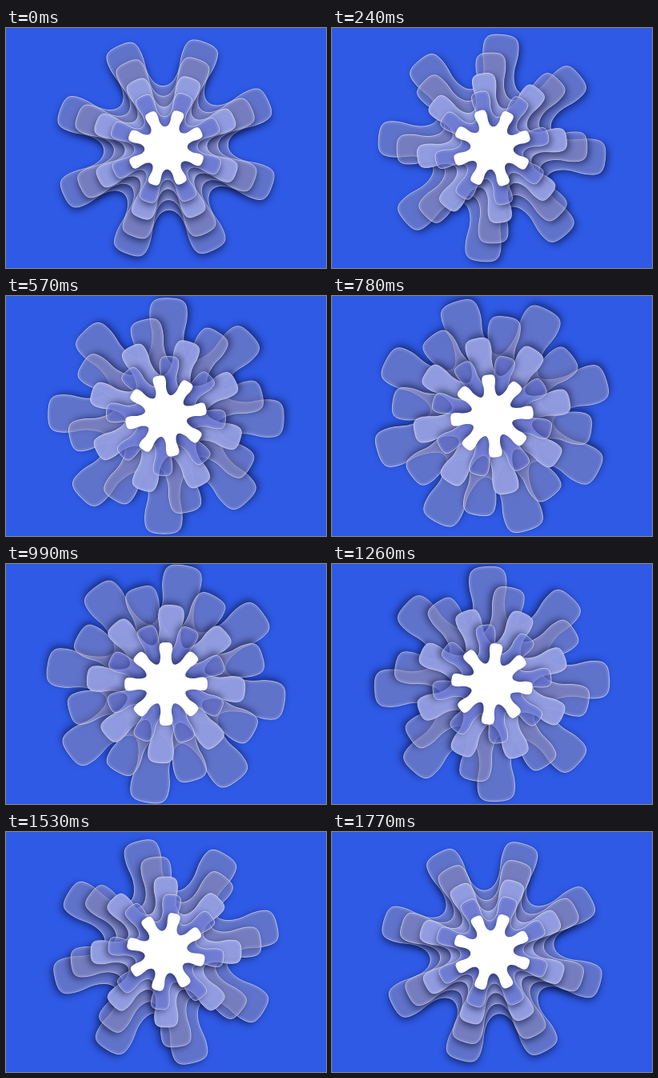
An HTML page with a canvas that plays this animation: 400x300 px, repeating every 1.8 s.

```html
<!DOCTYPE html>
<html lang="en">
<head>
<meta charset="utf-8">
<title>Layered flower</title>
<style>
  html, body { margin: 0; width: 100%; height: 100%; overflow: hidden; background: #2f5ae5; }
  canvas { display: block; width: 400px; height: 300px; }
</style>
</head>
<body>
<canvas id="stage"></canvas>
<script>
const W = 400, H = 300, LOOP = 1800, ARMS = 8;
const STEP = Math.PI * 2 / ARMS;
const REST = 20 * Math.PI / 180;

// From back to front; turns = arm steps travelled per loop
const layers = [
  { radius: 150, turns: 5, fill: 'rgba(134,135,183,.57)' },
  { radius: 125.5, turns: 4, fill: 'rgba(134,135,183,.57)' },
  { radius: 99, turns: 3, fill: 'rgba(147,157,225,.95)' },
  { radius: 76, turns: 2, fill: 'rgba(86,100,200,.57)' },
  { radius: 52, turns: 1, fill: '#fff', solid: true }
];

const canvas = document.getElementById('stage');
const ctx = canvas.getContext('2d');
const dpr = window.devicePixelRatio || 1;
canvas.width = W * dpr;
canvas.height = H * dpr;

// Star outline of unit radius; open runs 0..1 over the swell
function starPath(open) {
  const tip = .154 + .006 * open;
  const neck = .132;
  const valley = .55 - .04 * open;
  const half = STEP / 2;
  const vx = valley * Math.sin(half), vy = valley * Math.cos(half);
  const tx = .055 * Math.cos(half), ty = .055 * Math.sin(half);
  const side = [
    [vx - tx, vy + ty, neck, .59, neck, .67],
    [neck, .74, tip, .78, tip, .86],
    [tip, .97, tip * .83, 1, 0, 1],
    [-tip * .83, 1, -tip, .97, -tip, .86],
    [-tip, .78, -neck, .74, -neck, .67],
    [-neck, .59, tx - vx, vy + ty, -vx, vy]
  ];
  const path = new Path2D();
  for (let i = 0; i < ARMS; i++) {
    const c = Math.cos(i * STEP), s = Math.sin(i * STEP);
    const turn = (x, y) => [x * c - y * s, x * s + y * c];
    if (i === 0) path.moveTo(vx, vy);
    for (const b of side) {
      path.bezierCurveTo(...turn(b[0], b[1]), ...turn(b[2], b[3]), ...turn(b[4], b[5]));
    }
  }
  path.closePath();
  return path;
}

function place(unit, radius, angle) {
  const path = new Path2D();
  path.addPath(unit, new DOMMatrix()
    .translate(W / 2, H / 2)
    .rotate(angle * 180 / Math.PI)
    .scale(radius));
  return path;
}

// Casts a shadow; glass layers keep it outside their own outline
function drawShadow(layer, path, light) {
  ctx.save();
  if (!layer.solid) {
    const outside = new Path2D();
    outside.rect(-W, -H, 3 * W, 3 * H);
    outside.addPath(path);
    ctx.clip(outside, 'evenodd');
  }
  ctx.shadowColor = 'rgba(8,14,62,.62)';
  ctx.shadowBlur = 8 * dpr;
  ctx.shadowOffsetX = light.x * 4 * dpr;
  ctx.shadowOffsetY = light.y * 4 * dpr;
  ctx.fillStyle = layer.solid ? layer.fill : '#8c96d7';
  ctx.fill(path);
  ctx.restore();
}

function drawGlass(layer, path, light, radius) {
  ctx.fillStyle = layer.fill;
  ctx.fill(path);

  // Soft inner rim
  ctx.save();
  ctx.clip(path);
  ctx.strokeStyle = 'rgba(255,255,255,.08)';
  ctx.lineWidth = 6;
  ctx.stroke(path);
  ctx.restore();

  const dx = light.x * radius, dy = light.y * radius;
  const rim = ctx.createLinearGradient(W / 2 - dx, H / 2 - dy, W / 2 + dx, H / 2 + dy);
  rim.addColorStop(0, 'rgba(255,255,255,.65)');
  rim.addColorStop(1, 'rgba(255,255,255,.5)');
  ctx.strokeStyle = rim;
  ctx.lineWidth = .9;
  ctx.stroke(path);
}

function draw(ms) {
  const p = (ms % LOOP) / LOOP;
  const phase = p * Math.PI * 2;
  const open = (1 - Math.cos(phase)) / 2;
  const size = .937 + .063 * open;
  const light = { x: Math.sin(phase), y: Math.cos(phase) };
  const unit = starPath(open);

  ctx.setTransform(dpr, 0, 0, dpr, 0, 0);
  ctx.fillStyle = '#2f5ae5';
  ctx.fillRect(0, 0, W, H);
  for (const layer of layers) {
    const radius = layer.radius * size;
    const path = place(unit, radius, REST + layer.turns * STEP * p);
    drawShadow(layer, path, light);
    if (!layer.solid) drawGlass(layer, path, light, radius);
  }
}

const start = performance.now();
function tick(now) {
  draw(Math.max(0, now - start));
  requestAnimationFrame(tick);
}
draw(0);
requestAnimationFrame(tick);
</script>
</body>
</html>
```
